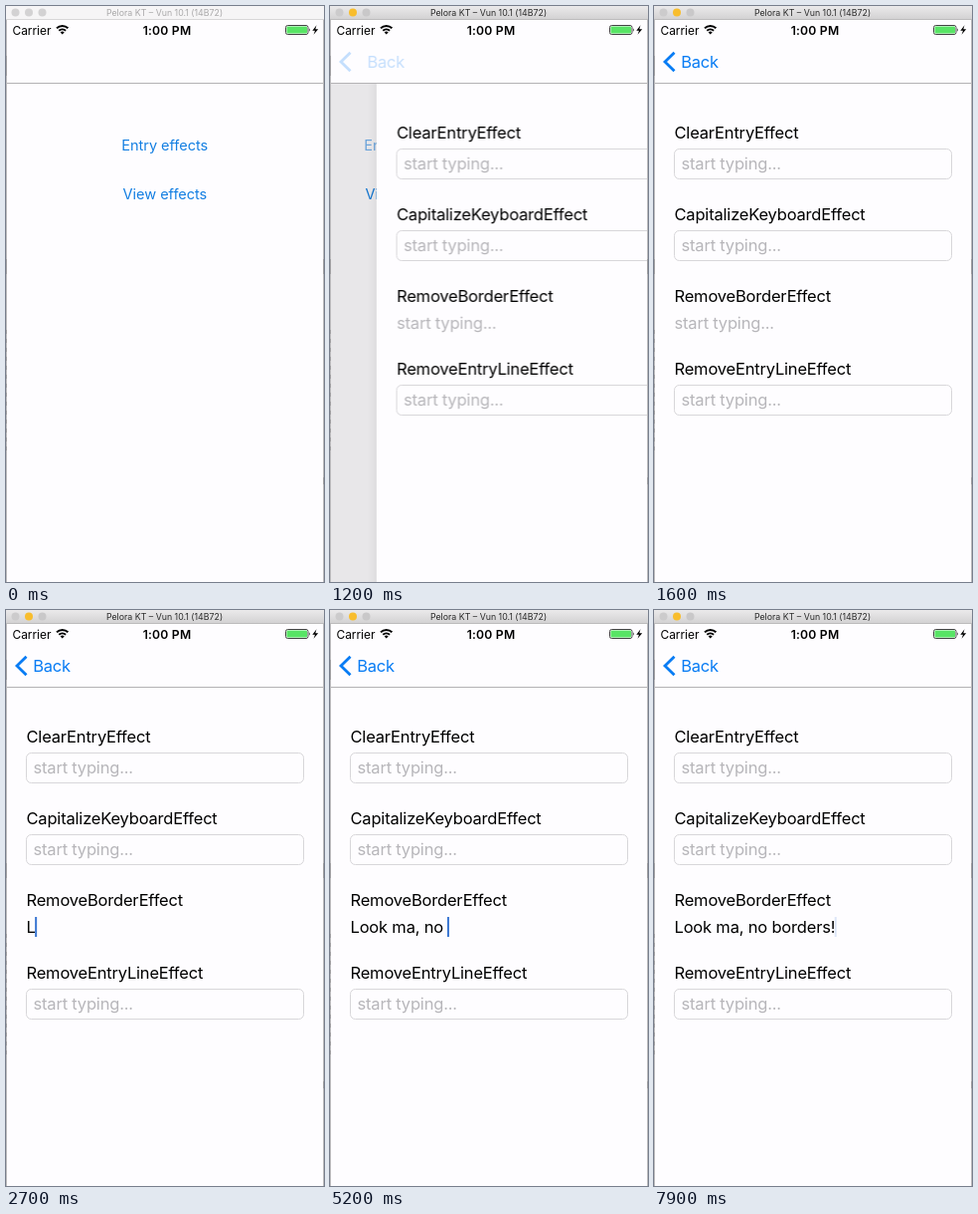
These frames come from a looping animation (320 px wide and 578 px high, 8 s). An HTML page:

```html
<!DOCTYPE html>
<html lang="en">
<head>
<meta charset="utf-8">
<title>Entry effects</title>
<style>
  html, body { margin: 0; width: 100%; height: 100%; overflow: hidden; background: #fefdff; }
  svg { display: block; width: 320px; height: 578px; overflow: hidden; }
  text { font: 16.5px Inter, Roboto, sans-serif; letter-spacing: -.19px; white-space: pre; }
  .mid { text-anchor: middle; }
  .hint { fill: #b7b6ba; }
  .button { font-size: 14.6px; letter-spacing: -.06px; fill: #147fe2; }
  .title { font-size: 8.8px; letter-spacing: 0; }
  .carrier { font-size: 11.9px; letter-spacing: 0; }
  .clock { font-size: 12.2px; font-weight: 600; letter-spacing: .2px; }
  .field { fill: #fefdff; stroke: #d8d7da; }

  /* critically damped spring over 500 ms */
  .push {
    animation: 8s infinite;
    animation-timing-function: linear(0, .067 5%, .21 10%, .507, .723, .853, .924, .963, .982, .991, .996, 1);
  }
  .back { animation-name: back; }
  .front { animation-name: front; }
  .dim { animation-name: dim; }
  .shadow { animation-name: shadow; }
  .label { animation-name: label; letter-spacing: -.3px; }
  .press { animation: press 8s linear infinite; }
  .nav { animation: nav 8s linear infinite; }
  .asleep { animation: asleep 8s step-end infinite; }

  @keyframes back {
    0%, 12.5% { transform: translateX(0); }
    18.75%, 100% { transform: translateX(-96px); }
  }
  @keyframes front {
    0%, 12.5% { transform: translateX(320px); }
    18.75%, 100% { transform: translateX(0); }
  }
  @keyframes dim {
    0%, 12.5% { opacity: 0; }
    18.75%, 100% { opacity: .1; }
  }
  @keyframes shadow {
    0%, 12.4% { opacity: 0; }
    12.41%, 12.5% { opacity: 1; }
    18.75%, 100% { opacity: 0; }
  }
  @keyframes label {
    0%, 12.5% { transform: translateX(70px); }
    18.75%, 100% { transform: translateX(0); }
  }
  @keyframes nav {
    0%, 12.5% { opacity: 0; }
    16.25% { opacity: .35; }
    19.5%, 100% { opacity: 1; }
  }
  @keyframes press {
    0%, 8.74% { opacity: 1; }
    8.75%, 12.6% { opacity: .2; }
    17.5%, 100% { opacity: 1; }
  }
  @keyframes asleep {
    0% { opacity: 1; }
    1.25%, 100% { opacity: 0; }
  }
</style>
</head>
<body>
<svg viewBox="0 0 320 578">
  <defs>
    <linearGradient id="bar" x2="0" y2="1">
      <stop offset="0" stop-color="#ebeaeb"/>
      <stop offset="1" stop-color="#d3d2d3"/>
    </linearGradient>
    <linearGradient id="fade">
      <stop offset="0" stop-color="#000" stop-opacity="0"/>
      <stop offset="1" stop-color="#000" stop-opacity=".28"/>
    </linearGradient>
  </defs>
  <rect width="320" height="578" fill="#fefdff"/>

  <g class="push back">
    <text class="mid button press" x="159.7" y="145">Entry effects</text>
    <text class="mid button" x="159.9" y="194.3">View effects</text>
  </g>
  <rect class="push dim" y="78" width="320" height="500"/>

  <g class="push front">
    <rect class="push shadow" x="-9" y="78" width="9" height="500" fill="url(#fade)"/>
    <rect y="78" width="320" height="500" fill="#fefdff"/>
    <text x="20.5" y="133">ClearEntryEffect</text>
    <rect class="field" x="20.5" y="143.5" width="279" height="30" rx="5"/>
    <text class="hint" x="27.5" y="164">start typing...</text>
    <text x="20.5" y="215">CapitalizeKeyboardEffect</text>
    <rect class="field" x="20.5" y="225.5" width="279" height="30" rx="5"/>
    <text class="hint" x="27.5" y="246">start typing...</text>
    <text x="20.5" y="297">RemoveBorderEffect</text>
    <text class="hint" id="hint" x="20.5" y="324">start typing...</text>
    <text id="typed" x="20.5" y="324"></text>
    <rect id="caret" x="20" y="308" width="2" height="20" fill="#3a76d2" opacity="0"/>
    <text x="20.5" y="370">RemoveEntryLineEffect</text>
    <rect class="field" x="20.5" y="380.5" width="279" height="30" rx="5"/>
    <text class="hint" x="27.5" y="401">start typing...</text>
  </g>

  <rect y="13" width="320" height="65" fill="#fefdff"/>
  <rect y="77" width="320" height="1" fill="#b4b3b5"/>
  <g class="nav">
    <path d="M20.5 46.8 11 56l9.5 9.2" fill="none" stroke="#087cf4" stroke-width="2.8"/>
    <text class="push label" x="27.3" y="61.8" fill="#087cf4">Back</text>
  </g>

  <text class="carrier" x="6.5" y="28.5">Carrier</text>
  <g fill="none" stroke="#000" stroke-width="1.9">
    <path d="M51 22.3a8.2 8.2 0 0 1 11.4 0"/>
    <path d="M53.3 24.8a5 5 0 0 1 6.8 0"/>
  </g>
  <path d="M54.7 26.4a3 3 0 0 1 4 0l-2 2.2z"/>
  <text class="mid clock" x="162" y="28.5">1:00 PM</text>
  <rect x="281.5" y="19.5" width="22.5" height="9" rx="2" fill="none" stroke="#444"/>
  <rect x="282.5" y="20.5" width="20.5" height="7" rx="1" fill="#58e465"/>
  <path d="M305 22.3q1.5 1.7 0 3.4z"/>
  <path d="M312.5 19.3 308.3 24.8h2.7l-1.5 4 4.7-5.6h-2.9z"/>

  <!-- window frame -->
  <g fill="#bdbcbe">
    <rect y="13" width="1" height="565"/>
    <rect x="319" y="13" width="1" height="565"/>
  </g>
  <g stroke="#a3a2a4">
    <path d="M.5 50v20M.5 254v15M319.5 254v15M319.5 473v7"/>
    <path d="M.5 325v125" stroke-dasharray="4 5"/>
  </g>

  <rect width="320" height="13" fill="url(#bar)"/>
  <rect y="13" width="320" height="1" fill="#bcbbbc"/>
  <circle cx="9.5" cy="6.5" r="4" fill="#cccbcc"/>
  <circle cx="23" cy="6.5" r="4" fill="#f8bd2d"/>
  <circle cx="36.5" cy="6.5" r="4" fill="#c9c8c9"/>
  <text class="mid title" x="159.5" y="9.8" fill="#2a2a2a">Pelora KT – Vun 10.1 (14B72)</text>
  <g class="asleep">
    <rect width="320" height="13" fill="#f6f5f6"/>
    <rect y="13" width="320" height="1" fill="#d8d7d8"/>
    <g fill="#d3d2d3">
      <circle cx="9.5" cy="6.5" r="4"/>
      <circle cx="23" cy="6.5" r="4"/>
      <circle cx="36.5" cy="6.5" r="4"/>
    </g>
    <text class="mid title" x="159.5" y="9.8" fill="#a9a8a9">Pelora KT – Vun 10.1 (14B72)</text>
  </g>
</svg>
<script>
  const LOOP = 8000, FOCUS = 1900;
  const line = 'Look ma, no borders!'.replace(/ /g, '\u00a0');
  const keys = [2600, 2800, 3000, 3300, 3900, 4100, 4300, 4500, 4700, 4800,
                5000, 5200, 5400, 5600, 5800, 6100, 6300, 6600, 6900, 7200];
  const [hint, typed, caret] = ['hint', 'typed', 'caret'].map(id => document.getElementById(id));
  const start = performance.now();

  // caret opacity by time since the last key
  function blink(idle) {
    const p = idle % 1000;
    if (p < 450) return 1;
    if (p < 750) return 1 - (p - 450) / 300;
    return p < 900 ? 0 : (p - 900) / 100;
  }

  function draw() {
    const t = (performance.now() - start) % LOOP;
    const count = keys.filter(k => k <= t).length;
    typed.textContent = line.slice(0, count);
    hint.setAttribute('opacity', count ? 0 : 1);
    const width = count ? typed.getComputedTextLength() : 0;
    caret.setAttribute('x', 20 + width);
    const last = count ? keys[count - 1] : FOCUS;
    caret.setAttribute('opacity', t < FOCUS ? 0 : blink(t - last));
    requestAnimationFrame(draw);
  }
  draw();
</script>
</body>
</html>
```
